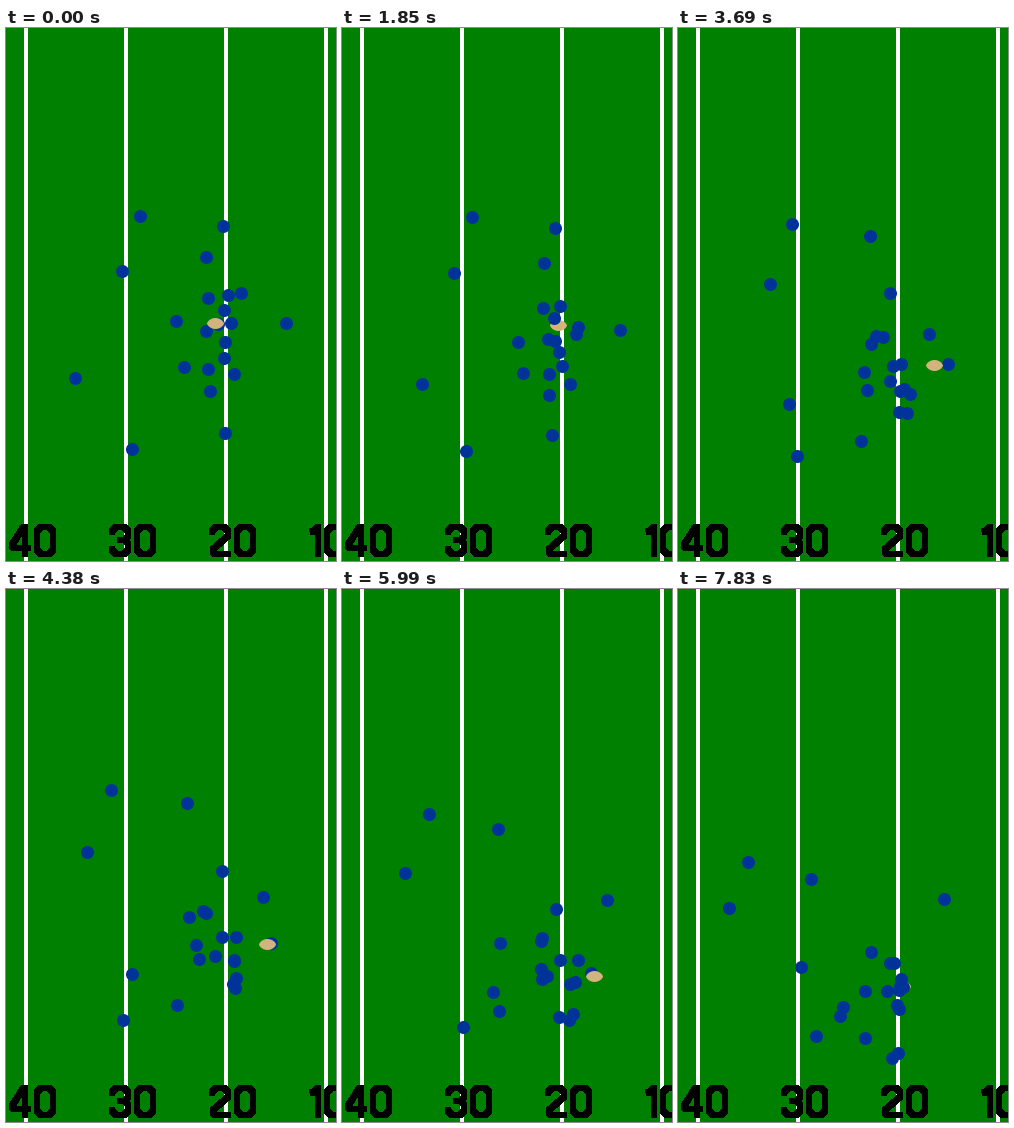
Recreate the animation shown at these times as a matplotlib script. Size 330 by 533 pixels, loop 8 s.

```python
import numpy as np
import matplotlib.pyplot as plt
from matplotlib.animation import FuncAnimation
from matplotlib.patches import Rectangle

W, H, DPI = 330, 533, 64
PT = 72 / DPI                      # points per pixel
GREEN, BLUE, TAN = "#008000", "#003399", "#d2b47c"
STEPS, MID = 35, 16
LAST = STEPS - 1
step_no = np.arange(STEPS)


def run(start, mid, end, power):
    """Power-law start up to mid, then constant acceleration to the end."""
    a, m, b = (np.array(p, float) for p in (start, mid, end))
    s = step_no[:, None]
    rise = a + (m - a) * (s / MID) ** power
    v = power * (m - a) / MID
    span, late = LAST - MID, s - MID
    acc = (b - m - v * span) / span ** 2
    return np.where(s < MID, rise, m + v * late + acc * late ** 2)


# Key points of each run, grouped by how quickly it starts.
late_runs = [
    [(134, 188), (114, 196), (70, 273)],
    [(217, 198), (192, 208), (133, 290)],
    [(200, 229), (212, 265), (193, 363)],
    [(116, 243), (92, 256), (51, 319)],
    [(204, 363), (221, 384), (214, 469)],
]
steady_runs = [
    [(69, 350), (111, 376), (165, 418)],
    [(126, 421), (119, 428), (138, 447)],
    [(219, 405), (183, 413), (162, 427)],
    [(202, 270), (198, 308), (212, 374)],
    [(222, 267), (205, 309), (216, 374)],
    [(218, 282), (193, 316), (123, 378)],
    [(200, 303), (223, 336), (223, 390)],
    [(219, 314), (212, 353), (187, 402)],
    [(218, 330), (226, 361), (219, 416)],
    [(178, 339), (189, 362), (221, 401)],
    [(202, 341), (222, 363), (221, 420)],
    [(228, 346), (229, 385), (220, 464)],
]
quick_runs = [
    [(170, 293), (186, 344), (209, 402)],
    [(212, 296), (215, 338), (222, 397)],
    [(235, 265), (232, 366), (187, 449)],
    [(225, 295), (251, 306), (266, 310)],
]
carrier = run((280, 295), (270, 336), (225, 398), 2.5)

groups = [(late_runs, 2.5), (steady_runs, 2), (quick_runs, 1.3)]
tracks = [run(*keys, power) for runs, power in groups for keys in runs]
players = np.round(np.stack(tracks + [carrier], axis=1))


def ball_track():
    """Snap, drop back, pitch, then carried by the runner."""
    catch = 21
    hold = carrier + np.interp(step_no, (26, LAST), (3, -1))[:, None]
    points = np.array([(209, 295), (243, 307), (256, 337), hold[catch]])
    thrown = np.column_stack([np.interp(step_no, (7, 12, MID, catch), p)
                              for p in points.T])
    return np.round(np.where(step_no[:, None] < catch, thrown, hold))


ball_pos = ball_track()

fig = plt.figure(figsize=(W / DPI, H / DPI), dpi=DPI, facecolor=GREEN)
ax = fig.add_axes([0, 0, 1, 1])
ax.set_xlim(0, W)
ax.set_ylim(H, 0)
ax.axis("off")

for x in range(20, W, 100):
    ax.add_patch(Rectangle((x - 2, 0), 4, H, fc="white", lw=0, aa=False))

# Digit strokes on a 22 x 33 cell: edges, chamfers and waist
L, R, T, B, C = 3, 19, 3, 30, 4
ARCH = [(L, 11), (L, T + C), (L + C, T), (R - C, T), (R, T + C), (R, 12)]
BOWL = [(R, 20), (R, B - C), (R - C, B), (L + C, B), (L, B - C), (L, 22)]
GLYPHS = {
    "0": [ARCH + BOWL + ARCH[:2]],
    "1": [[(8.5, 0), (8.5, 33)], [(1, 8), (5, 7), (8, 3)]],
    "2": [ARCH + [(L + 1, 25), (L + 1, B), (22, B)]],
    "3": [ARCH + [(R - 3, 16), (8, 16)], [(8, 16), (R - 3, 16)] + BOWL],
    "4": [[(16, 0), (16, 33)], [(15, 2), (L, 21), (L, 24), (22, 24)]],
}


def draw_digit(ch, x, y):
    for stroke in GLYPHS[ch]:
        px, py = np.array(stroke).T
        ax.plot(px + x, py + y, color="black", lw=6 * PT, aa=False,
                solid_capstyle="butt", solid_joinstyle="bevel")


for k, label in enumerate(["40", "30", "20", "10"]):
    left = 3 + 100 * k
    draw_digit(label[0], left, 496)
    draw_digit(label[1], left + (15 if label[0] == "1" else 25), 496)

dots = ax.scatter(*players[0].T, s=(13 * PT) ** 2, c=BLUE, lw=0,
                  antialiased=False, zorder=5)
a = np.linspace(0, 2 * np.pi, 60)
lens = np.column_stack([8.5 * np.cos(a),
                        5.5 * np.sin(a) * np.abs(np.sin(a)) ** 0.35])
ball = ax.scatter(*ball_pos[0], s=(17 * PT) ** 2, c=TAN, marker=lens, lw=0,
                  antialiased=False, zorder=6)


def update(i):
    step = min(2 * i // 23, LAST)           # one step every 230 ms
    dots.set_offsets(players[step])
    ball.set_offsets(ball_pos[step])
    covered = 8 <= step % 13 <= 10          # ball dips under the pile
    ball.set_zorder(4 if covered else 6)
    return dots, ball


anim = FuncAnimation(fig, update, frames=400, interval=20, repeat=True,
                     repeat_delay=0, blit=False)
plt.show()
```
